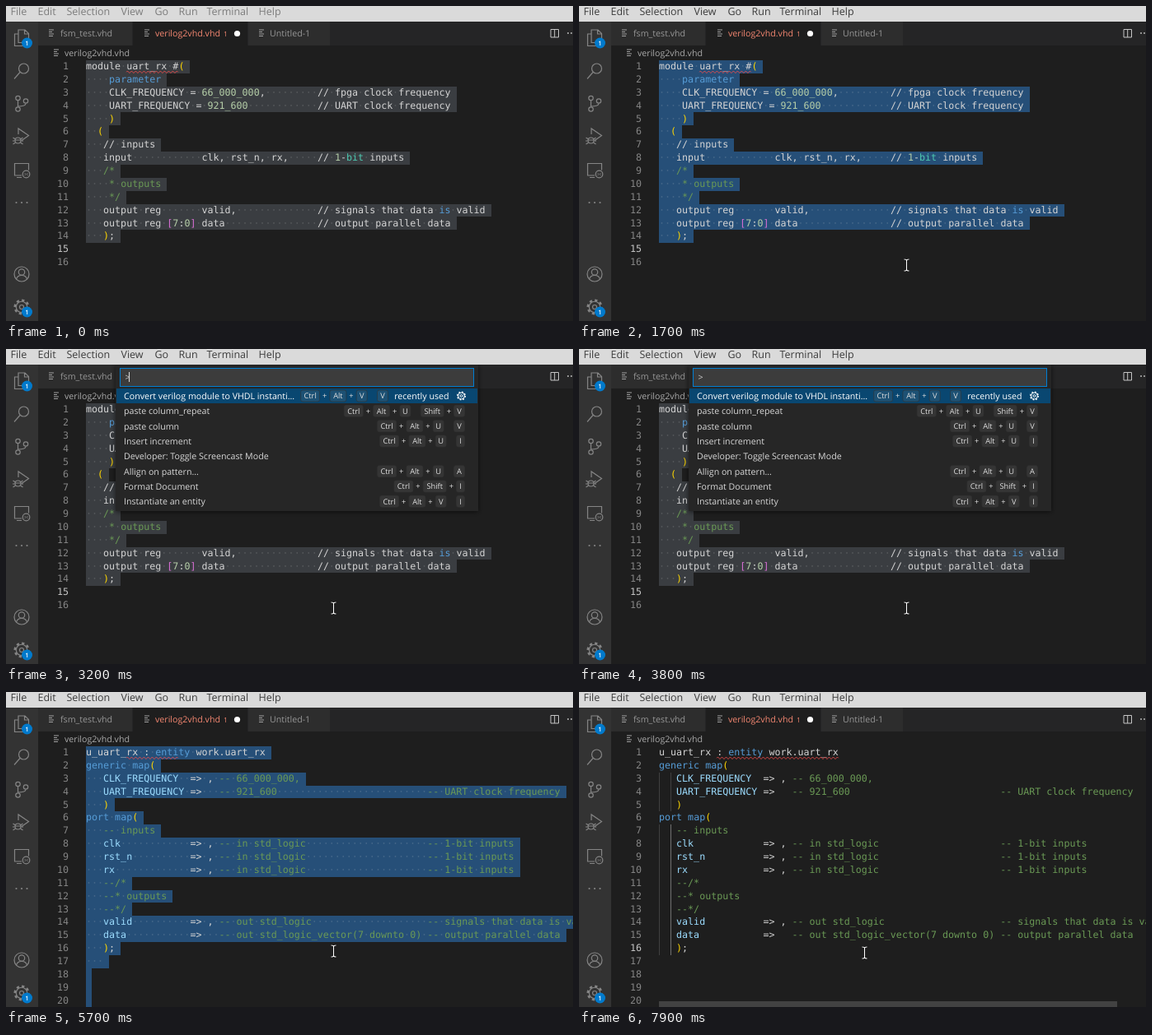
An HTML page that plays this animation: 688x383 px, repeating every 8 s.

```html
<!DOCTYPE html>
<html lang="en">
<head>
<meta charset="utf-8">
<title>Verilog to VHDL</title>
<style>
html, body { margin: 0; width: 100%; height: 100%; overflow: hidden; background: #1e1e1e; }
svg { display: block; }
text { font: 10.65px "Open Sans", "Noto Sans", sans-serif; white-space: pre; text-rendering: geometricPrecision; }
text.code { font: 11.667px "DejaVu Sans Mono", monospace; }
text.key { font-size: 9.3px; text-anchor: middle; }
text.badge { font-size: 7.5px; font-weight: 600; text-anchor: middle; }
#menu text { font-size: 12.5px; }
.icon { fill: none; stroke: #858585; stroke-width: 1.2; }
</style>
</head>
<body>
<svg id="stage" width="688" height="383" viewBox="0 0 688 383"></svg>
<script>
const LEFT = 97, TOP = 66, CHAR = 7.024, LINE = 15.87, BASE = 77.1;
const verilog = `module uart_rx #(
    parameter
    CLK_FREQUENCY = 66_000_000,         // fpga clock frequency
    UART_FREQUENCY = 921_600            // UART clock frequency
    )
  (
   // inputs
   input            clk, rst_n, rx,     // 1-bit inputs
   /*
    * outputs
    */
   output reg       valid,              // signals that data is valid
   output reg [7:0] data                // output parallel data
   );`.split('\n');

const port = (name, sep, type, note) =>
  `   ${name.padEnd(15)}=> ${sep} ${type.padEnd(36)}${note && '-- ' + note}`.trimEnd();
const vhdl = [
  'u_uart_rx : entity work.uart_rx',
  'generic map(',
  port('CLK_FREQUENCY', ',', '-- 66_000_000,', ''),
  port('UART_FREQUENCY', ' ', '-- 921_600', 'UART clock frequency'),
  '   )',
  'port map(',
  '   -- inputs',
  ...['clk', 'rst_n', 'rx'].map(n => port(n, ',', '-- in std_logic', '1-bit inputs')),
  '   --/*', '   --* outputs', '   --*/',
  port('valid', ',', '-- out std_logic', 'signals that data is valid'),
  port('data', ' ', '-- out std_logic_vector(7 downto 0)', 'output parallel data'),
  '   );', '   ', '', '', '', ''
];

const colours = {
  comment: '#6a9955', keyword: '#569cd6', type: '#4ec9b0', arg: '#9cdcfe',
  number: '#b5cea8', round: '#ffd700', square: '#da70d6', plain: '#d4d4d4'
};
const syntax = new RegExp([
  /(?<comment>--.*|\/\*|\*\/|\* outputs)/,
  /(?<keyword>\b(?:parameter|is|entity|generic|port|map)\b)/,
  /(?<type>\bbit\b)/, /(?<arg>\w+(?=\s*=>))/, /(?<number>\b\d[\d_]*)/,
  /(?<round>[()])/, /(?<square>[[\]])/, /(?<plain>[A-Za-z_]\w*|[^\s\w])/
].map(r => r.source).join('|'), 'g');

const escape = s => s.replace(/&/g, '&amp;').replace(/</g, '&lt;').replace(/>/g, '&gt;');
const paint = fill => fill ? `fill="${fill}"` : '';
const text = (x, y, s, fill = '#ccc', attrs = '') =>
  `<text x="${x}" y="${y}" ${paint(fill)} ${attrs}>${escape(s)}</text>`;
const rect = (x, y, w, h, fill, attrs = '') =>
  `<rect x="${x}" y="${y}" width="${w}" height="${h}" ${paint(fill)} ${attrs}/>`;
const circle = (x, y, r, attrs = '') => `<circle cx="${x}" cy="${y}" r="${r}" ${attrs}/>`;
const path = (d, attrs = '') => `<path d="${d}" ${attrs}/>`;
const group = (id, body, attrs = '') => `<g id="${id}" ${attrs}>${body}</g>`;
const col = c => LEFT + c * CHAR;
const rowTop = i => Math.round(TOP + i * LINE);
const codeText = (c, i, s, fill, attrs = '') => text(col(c), BASE + i * LINE, s, fill, `class="code" ${attrs}`);

const codeLine = (line, i) => [...line.matchAll(syntax)].map(m => {
  const kind = Object.keys(colours).find(k => m.groups[k] !== undefined);
  return codeText(m.index, i, m[0], colours[kind]);
}).join('');

const selection = lines => lines.map((line, i) =>
  rect(LEFT, rowTop(i), Math.round((line.length + 1) * CHAR), rowTop(i + 1) - rowTop(i)) +
  codeText(0, i, line.replace(/./g, c => c === ' ' ? '·' : ' '), '#e3e4e2', 'opacity=".16"')).join('');

const squiggle = (id, from, to) => group(id, path(
  `M${col(from)} 80.3q1.25 -2.6 2.5 0` + 't2.5 0'.repeat(Math.round((to - from) * CHAR / 2.5) - 1),
  'fill="none" stroke="#f14c4c" stroke-width=".9"'));

const guide = (c, from, to, fill) => rect(Math.round(col(c)), rowTop(from), 1, rowTop(to) - rowTop(from), fill);
const fileIcon = (x, y) => path(`M${x} ${y - 4}h6M${x} ${y - 1.5}h4M${x} ${y + 1}h6M${x} ${y + 3.5}h5`,
  'stroke="#a0a0a0" stroke-width="1"');
const badge = (x, y) => circle(x, y, 6.5, 'fill="#007acc"') + text(x, y + 2.8, '1', '#fff', 'class="badge"');
const gear = (x, y, r) => circle(x, y, r * .75) + circle(x, y, r * .28) +
  circle(x, y, r * .92, `stroke-width="${r * .28}" stroke-dasharray="${r * .36}"`);

const menu = [['File', 5], ['Edit', 38], ['Selection', 73], ['View', 139], ['Go', 180],
  ['Run', 209], ['Terminal', 243], ['Help', 306]].map(([s, x]) => text(x + .5, 10.8, s, '')).join('');

const tabs = rect(39, 19, 649, 29, '#252526') + rect(39, 19, 114, 29, '#2d2d2d') +
  rect(154, 19, 139, 29, '#1e1e1e') + rect(294, 19, 99, 29, '#2d2d2d') +
  fileIcon(52, 33) + text(66, 37, 'fsm_test.vhd', '#969696') +
  fileIcon(168, 33) + text(181, 37, 'verilog2vhd.vhd', '#f48771') +
  text(264, 37, '1', '#f48771', 'style="font-size:8.5px"') + circle(280.5, 33.5, 3.6, 'fill="#fff"') +
  fileIcon(307, 33) + text(320, 37, 'Untitled-1', '#969696') +
  path('M661 28.5h9.5v9.5h-9.5zM665.7 28.5v9.5', 'fill="none" stroke="#c5c5c5"') +
  [682, 686].map(x => circle(x, 33, .9, 'fill="#c5c5c5"')).join('') +
  fileIcon(58, 57) + text(71, 61, 'verilog2vhd.vhd', '#a9a9a9');

const activity = rect(0, 19, 39, 364, '#333') + `<g class="icon">` +
  path('M15 33v-4h8l4.5 4.5v11h-12.5zM22.5 29v5h5M15 34h-4.5v14.5h12v-4') +
  circle(21.5, 76, 6) + path('M17 80.5l-7 8') +
  circle(14.5, 112, 2.7) + circle(14.5, 125.5, 2.7) + circle(24, 115.5, 2.7) +
  path('M14.5 114.5v8M24 118.5q0 3.5 -9.5 3.5') +
  path('M15 156v-7l12.5 8.5l-8.5 6') + circle(14.5, 163.5, 3.5) +
  path('M8.5 160l3 2M8 164h3M8.5 168l3 -2M20.5 160l-3 2M21 164h-3M20.5 168l-3 -2M11 163h7') +
  path('M19 206h-8.5v-14.5h17v8M13 208.5h6') + circle(24.5, 204.5, 4.3) +
  path('M22.5 203l1.5 1.5l-1.5 1.5M26.7 203l-1.5 1.5l1.5 1.5', 'stroke-width=".8"') +
  circle(19, 326, 9) + circle(19, 323.5, 3.7) + path('M12.5 332.5q1 -5 6.5 -5t6.5 5') +
  gear(19, 366, 9) + '</g>' +
  [12.5, 19, 25.5].map(x => circle(x, 239, 1.1, 'fill="#858585"')).join('') +
  badge(25.5, 45) + badge(25.5, 372);

const numbers = Array.from({ length: 20 }, (_, i) =>
  text(76, BASE + i * LINE, String(i + 1), '#858585', `class="code num" text-anchor="end"`)).join('');

const keyWidth = { Ctrl: 23, Alt: 20, Shift: 28, I: 10 };
// Lays key caps out from the right edge; a chord is written like "Ctrl+Alt+U I".
function keys(spec, right, y) {
  let out = '';
  for (const p of spec.split(/([+ ])/).reverse()) {
    if (p === '+' || p === ' ') {
      if (p === '+') out += text(right - 6.2, y + 3.3, '+', '#ddd', 'class="key"');
      right -= 12.3;
      continue;
    }
    const w = keyWidth[p] || 13;
    out += rect(right - w, y - 7, w, 14, '#808080', 'fill-opacity=".17" rx="2.5" stroke="#333" stroke-opacity=".6"') +
      text(right - w / 2, y + 3.3, p, '#ddd', 'class="key"');
    right -= w;
  }
  return out;
}

const commands = [
  ['Convert verilog module to VHDL instanti…', 'Ctrl+Alt+V V'],
  ['paste column_repeat', 'Ctrl+Alt+U Shift+V'],
  ['paste column', 'Ctrl+Alt+U V'],
  ['Insert increment', 'Ctrl+Alt+U I'],
  ['Developer: Toggle Screencast Mode', ''],
  ['Allign on pattern...', 'Ctrl+Alt+U A'],
  ['Format Document', 'Ctrl+Shift+I'],
  ['Instantiate an entity', 'Ctrl+Alt+V I']
];
const commandList = active => commands.map(([label, spec], i) => {
  const y = 57 + i * 18.333, on = i === active, right = on ? 537.5 : 556.5, ink = on ? '#fff' : '#d8d8d8';
  const name = i || on ? label : label.replace('…', 'ati…');
  return (on ? rect(134, 48, 438, 18, '#094771', `transform="translate(0 ${y - 57})"`) : '') +
    text(143, y + 4, name, ink) +
    (spec && keys(spec, i ? right : right - 74, y)) +
    (i ? '' : text(right, y + 4, 'recently used', ink, 'text-anchor="end"')) +
    (on ? `<g fill="none" stroke="#fff">${gear(552.5, y, 5.2)}</g>` : '');
}).join('');

const palette = rect(133, 19, 440, 178, '#252526', 'filter="url(#shadow)"') +
  rect(138.5, 23.5, 429, 22, '#3c3c3c', 'stroke="#007fd4"') + text(144.5, 38.3, '>') +
  group('first', commandList(0)) + group('second', commandList(1)) +
  group('thumb', rect(565, 49, 7, 16, '#797979')) +
  group('inputCaret', rect(149, 28, 1, 12, '#ddd'));

const beam = 'M-3 -7q3 0 3 1.5q0 -1.5 3 -1.5M0 -5.5v11M-3 7q3 0 3 -1.5q0 1.5 3 1.5';

stage.innerHTML =
  '<filter id="shadow" x="-5%" y="-5%" width="110%" height="115%"><feDropShadow dx="0" dy="1" stdDeviation="3" flood-opacity=".6"/></filter>' +
  rect(0, 0, 688, 383, '#1e1e1e') +
  group('before', group('beforeSel', selection(verilog)) + verilog.map(codeLine).join('') + squiggle('warn0', 7, 16)) +
  group('after', group('afterSel', selection(vhdl), 'fill="#264f78"') +
    group('guides', guide(0, 2, 5, '#404040') + guide(0, 6, 16, '#404040') + guide(2, 2, 5, '#404040') + guide(2, 6, 16, '#707070')) +
    vhdl.map(codeLine).join('') + squiggle('warn1', 7, 16) + squiggle('warn2', 10, 31)) +
  numbers +
  group('scrollbar', rect(97, 376, 556, 7, '#797979')) +
  group('caret15', rect(97, 288, 1, 16, '#aeafad')) + group('caret16', rect(132, 304, 1, 16, '#aeafad')) +
  tabs + activity + group('palette', palette) +
  rect(0, 0, 688, 19, '#dadada') + group('menu', menu) +
  group('mouse', path(beam, 'stroke="#111" stroke-width="2.6"') + path(beam, 'stroke="#fff" stroke-width="1.1"'), 'fill="none"');

const $ = id => document.getElementById(id);
const show = (id, on) => $(id).setAttribute('display', on ? 'inline' : 'none');
const fade = (id, v) => $(id).setAttribute('opacity', v);
const within = (t, ...spans) => spans.some(([a, b]) => t >= a && t < b);
const ramp = (t, a, b) => Math.min(1, Math.max(0, (t - a) / (b - a)));
const nums = [...document.querySelectorAll('.num')];

function draw(now) {
  const t = Math.floor(now % 8000 / 100) * 100;
  const converted = t >= 5700, open = within(t, [1900, 5600]), selected = t < 7400;
  $('menu').setAttribute('fill', t < 300 ? '#7c7c7c' : '#3c3c3c');
  $('beforeSel').setAttribute('fill', t < 300 || open ? '#3a3d41' : '#264f78');
  show('before', !converted);
  show('after', converted);
  show('afterSel', selected);
  show('guides', !selected);
  show('warn1', t < 7300);
  show('warn2', t >= 7300);
  const current = converted ? (selected ? 0 : 16) : 15;
  nums.forEach((n, i) => {
    n.setAttribute('fill', i + 1 === current ? '#c6c6c6' : '#858585');
    n.setAttribute('display', converted || i < 16 ? 'inline' : 'none');
  });
  fade('scrollbar', .4 * ramp(t, 5700, 5900));
  show('caret15', within(t, [300, 700], [1200, 1700]));
  show('caret16', within(t, [7400, 7900]));

  const second = within(t, [3500, 3800]);
  show('palette', open);
  show('first', !second);
  show('second', second);
  fade('thumb', t < 2400 ? 0 : .4 * (1 - ramp(t, 2800, 3200)));
  show('inputCaret', within(t, [1900, 2900], [3200, 3800], [4400, 4900]));

  const enter = ramp(t, 700, 900), drift = ramp(t, 6500, 6900);
  show('mouse', t >= 700);
  $('mouse').setAttribute('transform',
    `translate(${540.5 - 143 * enter - 51 * drift} ${214 + 101 * enter + 2 * drift})`);
  requestAnimationFrame(loop);
}
const start = performance.now();
const loop = () => draw(performance.now() - start);
loop();
</script>
</body>
</html>
```
